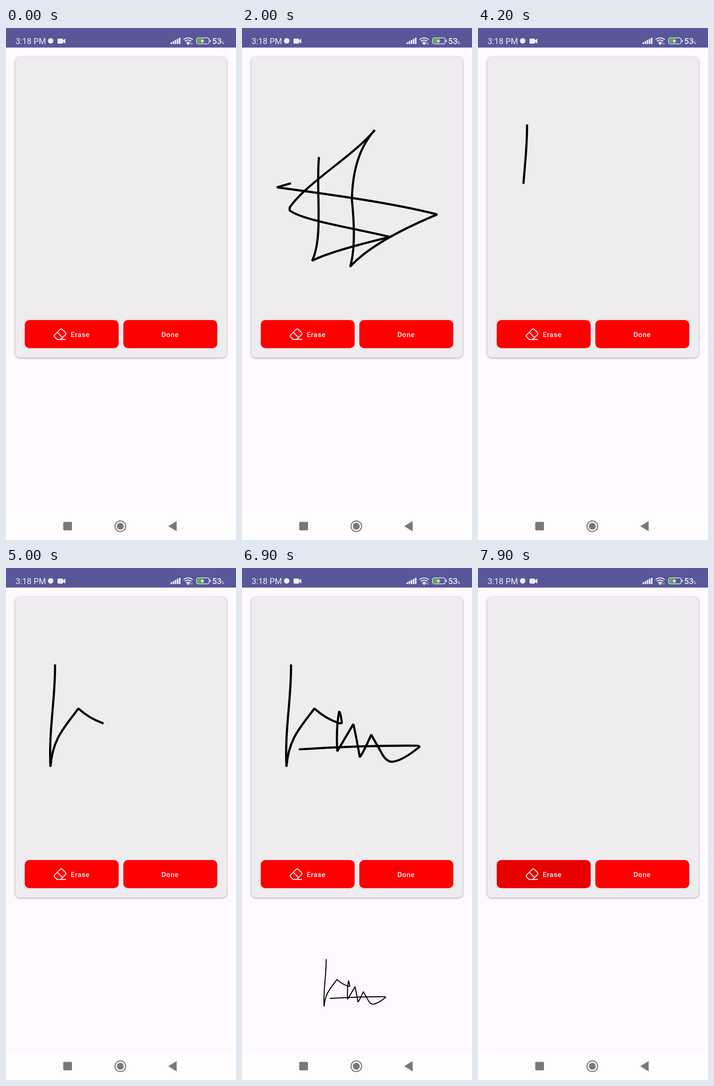
Animation, 502 px wide and 1115 px high, one loop 8 s. Source, as an HTML page:

```html
<!DOCTYPE html>
<html lang="en">
<head>
<meta charset="utf-8">
<title>Drawing pad</title>
<style>
  html, body { margin: 0; width: 100%; height: 100%; overflow: hidden; background: #fef9fe; }
  svg { display: block; width: 502px; height: 1115px; font-family: Roboto, sans-serif; }
  .card { fill: #eeecee; filter: drop-shadow(0 1.5px 2px #0006); }
  .button { fill: #f00; }
  .label { fill: #fff; font-size: 15.3px; font-weight: 500; letter-spacing: .64px; }
  .status { fill: #eeeef5; font-size: 18px; }
  .line { fill: none; stroke: #eeeef5; stroke-width: 2; }
  .ink { fill: none; stroke: #000; stroke-width: 4.7; stroke-linejoin: bevel; }
  .icon { fill: none; stroke: #fff; stroke-width: 1.5; stroke-linejoin: round; stroke-linecap: round; }
  .nav { fill: #7a777a; }
</style>
</head>
<body>
<svg viewBox="0 0 502 1115">
  <defs>
    <rect id="button" y="636" width="205" height="61.3" rx="10"/>
    <clipPath id="eraseClip"><use href="#button" x="40.9"/></clipPath>
    <clipPath id="doneClip"><use href="#button" x="256.1"/></clipPath>
  </defs>
  <rect width="502" height="1115" fill="#fef9fe"/>
  <rect y="1054" width="502" height="61" fill="#fefdfe"/>
  <rect width="502" height="42.6" fill="#575799"/>

  <g class="status">
    <text x="21" y="35">3:18 PM</text>
    <circle cx="97.5" cy="28" r="6"/>
    <path d="M114 23h9q1.5 0 1.5 1.5v2.500l5-4v11l-5-4v2.500q0 1.500-1.500 1.500h-9q-1.500 0-1.500-1.500v-8q0-1.500 1.500-1.500z"/>
    <g id="signal"></g>
    <g class="line">
      <path d="M387.5 25.5a14.500 14.500 0 0 1 20 0M390.500 29a10 10 0 0 1 14 0M393.500 32.200a6 6 0 0 1 8 0"/>
      <rect x="416" y="21.5" width="27.5" height="13" rx="4" stroke-width="1.6"/>
    </g>
    <path d="M394.5 33.5q3-2 6 0l-3 3.200zM403 36v-4M406 32v4" stroke="#eeeef5"/>
    <rect x="445" y="25.5" width="2" height="5" rx="1"/>
    <rect x="418" y="23.5" width="10.5" height="9" rx="2" fill="#55bd32"/>
    <path d="M431 22.5l-6.500 6.500h4l-1.500 5 6.500-6.500h-4z"/>
    <text x="450" y="35" font-weight="500">53</text>
    <text x="469.5" y="35" font-weight="500" style="font-size:9px">%</text>
  </g>

  <rect class="card" x="20.4" y="63" width="461.2" height="654.7" rx="10"/>
  <use class="button" href="#button" x="40.9"/>
  <use class="button" href="#button" x="256.1"/>
  <g clip-path="url(#eraseClip)"><circle id="eraseRipple" cx="145" cy="667"/></g>
  <g clip-path="url(#doneClip)"><circle id="doneRipple" cx="340" cy="667"/></g>
  <path class="icon" transform="translate(102.7 651.4) scale(1.277)"
        d="M7 21l-4.3-4.3q-1.5-1.7 0-3.4l9.6-9.6q1.700-1.500 3.400 0l5.600 5.600q1.500 1.700 0 3.400L13 21M21.500 21H7M7.200 8.800l9 9"/>
  <text class="label" x="141.2" y="672.5">Erase</text>
  <text class="label" x="339.2" y="672.5">Done</text>

  <path id="ink" class="ink" pathLength="1"/>
  <path id="preview" class="ink" transform="translate(134.2 754.5) scale(.463)"/>

  <g class="nav">
    <rect x="125" y="1075.5" width="19" height="18.500" rx="2.500"/>
    <circle cx="249.5" cy="1085" r="11.600" fill="none" stroke="#7a777a" stroke-width="2.200"/>
    <circle cx="249.5" cy="1085" r="7.500"/>
    <path d="M355 1085l17-10.5v21z" stroke="#7a777a" stroke-linejoin="round"/>
  </g>
</svg>
<script>
const LOOP = 8000, STEP = 100;
const el = id => document.getElementById(id);
const clamp = x => Math.max(0, Math.min(1, x));

// `pace` pairs a time with the share of the path drawn by then.
const drawings = [
  {
    path: `M168 281C161 355 178 455 153 507Q190 487 323 455C250 437 130 419 104 397V391
      C140 338 245 277 290 222Q241 276 240 375Q250 475 236 520
      Q285 465 426 406C325 380 180 361 76 347L107 338`,
    pace: [[0, 0], [1000, .684], [1300, 1]],
    done: 2400, erase: 3200
  },
  {
    path: `M107 210C108 285 93 350 97 433C102 370 128 347 158 306Q182 328 212 338H218
      Q216 318 212 312Q205 350 208 399L243 340Q249 365 257 412Q265 402 282 363
      L307 407Q316 422 328 422Q350 420 388 389L384 387Q260 386 124 395`,
    pace: [[4100, 0], [4200, .112], [5000, .372], [5700, .689], [6000, 1]],
    done: 6900, erase: 7700
  }
];

function drawnShare(pace, t) {
  const next = pace.findIndex(([time]) => time > t);
  if (next < 1) return next < 0 ? 1 : 0;
  const [t0, s0] = pace[next - 1], [t1, s1] = pace[next];
  return s0 + (s1 - s0) * (t - t0) / (t1 - t0);
}

function ripple(circle, age) {
  const active = age >= 0 && age < 650;
  circle.setAttribute('r', 20 + 110 * clamp(age / 200));
  circle.setAttribute('opacity', active ? .09 * clamp((age + 40) / 120) * clamp((650 - age) / 300) : 0);
}

function render(t) {
  const drawing = t < drawings[1].pace[0][0] ? drawings[0] : drawings[1];
  const share = t < drawing.erase ? drawnShare(drawing.pace, t) : 0;
  el('ink').setAttribute('d', share ? drawing.path : '');
  el('ink').setAttribute('stroke-dasharray', `${share} 2`);
  el('preview').setAttribute('d', share && t >= drawing.done ? drawing.path : '');
  ripple(el('doneRipple'), t - drawing.done);
  ripple(el('eraseRipple'), t - drawing.erase);
}

for (let i = 0; i < 5; i++) {
  const height = 4 + 2.5 * i;
  el('signal').innerHTML += `<rect x="${359 + 4.6 * i}" y="${35 - height}" width="3.4" height="${height}" rx="1"/>`;
}

const start = performance.now();
function tick() {
  const t = (performance.now() - start) % LOOP;
  render(Math.floor(t / STEP) * STEP);
  requestAnimationFrame(tick);
}
tick();
</script>
</body>
</html>
```
